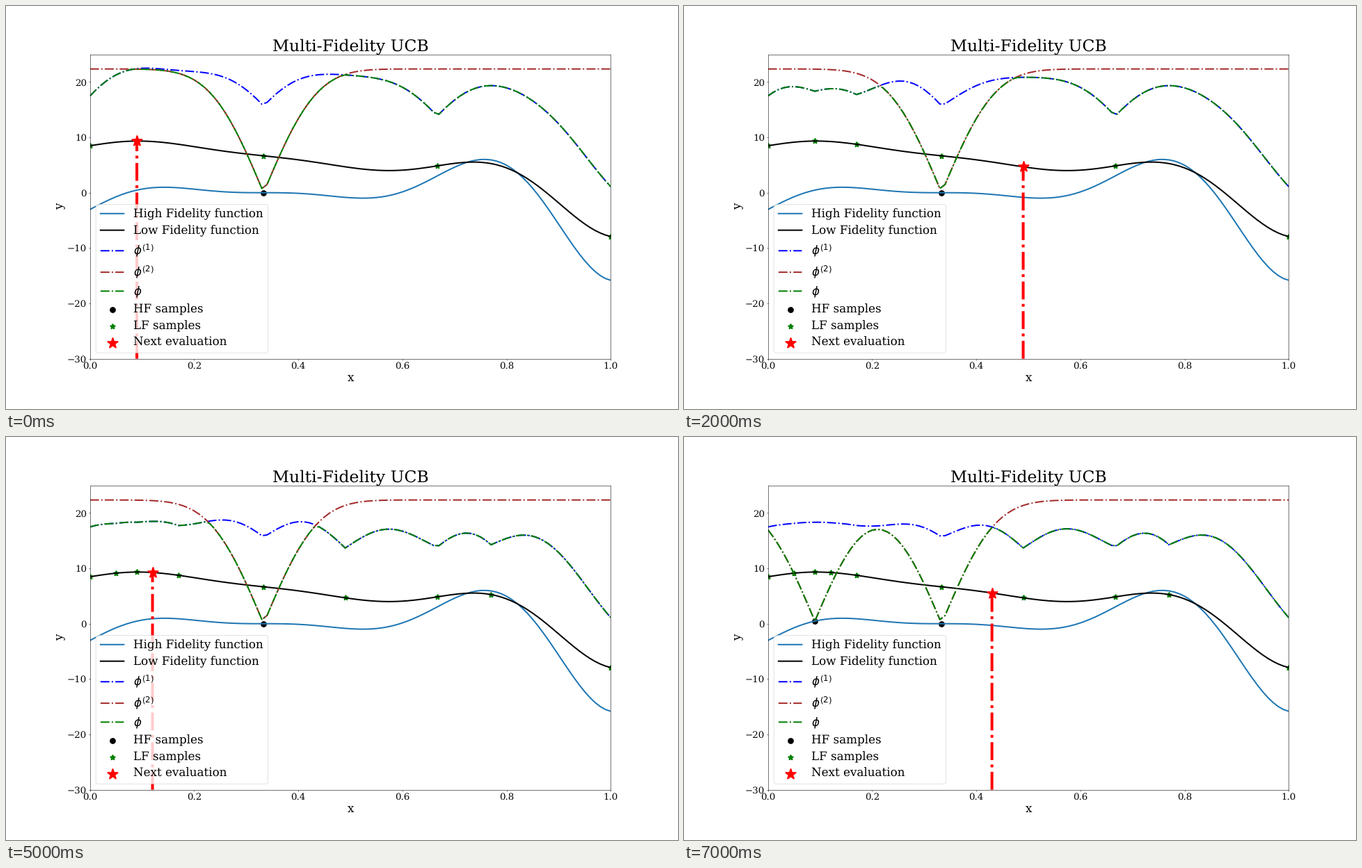
These frames come from a looping animation (966 px wide and 580 px high, 8000 ms). A matplotlib script:

```python
import numpy as np
import matplotlib.pyplot as plt
from matplotlib.animation import FuncAnimation
from matplotlib.patches import FancyBboxPatch
from matplotlib.transforms import IdentityTransform

W, H, DPI = 966, 580, 72  # at 72 dpi one point is one pixel
PT = 0.4830 * 100 / 72    # pixels per nominal design point
EM = 25 * PT
LINE = 3 * PT

plt.rcParams.update({
    "font.family": "DejaVu Serif",
    "text.hinting": "none",
    "axes.linewidth": 0.8 * PT,
    "axes.labelsize": EM,
    "axes.labelpad": 4 * PT,
    "axes.titlesize": 35 * PT,
    "axes.titlepad": 6 * PT,
    "lines.linewidth": LINE,
})
for axis in ("xtick", "ytick"):
    plt.rcParams.update({
        f"{axis}.labelsize": 20 * PT,
        f"{axis}.major.size": 3.5 * PT,
        f"{axis}.major.pad": 3.5 * PT,
        f"{axis}.major.width": 0.8 * PT,
    })

LENGTH = 0.1             # kernel length scale
WIDTH_LO = 10.0          # confidence widths of the two models
WIDTH_HI = np.sqrt(500)
BIAS = 9.0               # bound on the gap between the fidelities
Y_MIN, Y_MAX = -30, 25


def high(x):
    return -(6 * x - 2) ** 2 * np.sin(12 * x - 4)


def low(x):
    return 0.5 * high(x) - 10 * (x - 0.5) + 5


def kernel(a, b):
    return np.exp(-0.5 * ((a[:, None] - b[None, :]) / LENGTH) ** 2)


def upper_bound(x, samples, func, width):
    """Mean plus scaled deviation of a zero-mean Gaussian process."""
    gram = kernel(samples, samples) + 1e-8 * np.eye(len(samples))
    cross = kernel(x, samples)
    weights = np.linalg.solve(gram, cross.T).T
    var = 1 - np.sum(weights * cross, axis=1)
    return weights @ func(samples) + width * np.sqrt(np.maximum(var, 0))


# Points evaluated one after another: position and function
QUERIES = [(0.09, low), (0.17, low), (0.49, low), (0.05, low),
           (0.77, low), (0.12, low), (0.09, high), (0.43, low)]
START = {low: [0, 1 / 3, 2 / 3, 1], high: [1 / 3]}

grid = np.linspace(0, 1, 101)

fig = plt.figure(figsize=(W / DPI, H / DPI), dpi=DPI, facecolor="white")
ax = fig.add_axes([0.125, 0.1248, 0.775, 0.7552])
ax.set(xlim=(0, 1), ylim=(Y_MIN, Y_MAX), xlabel="x", title="Multi-Fidelity UCB")
ax.set_ylabel("y", labelpad=2.5 * PT)

# Looks shared by the plot and its legend
HIGH = dict(color="tab:blue")
LOW = dict(color="black")
PHI_LO, PHI_HI, PHI = (dict(color=c, linestyle="-.")
                       for c in ("blue", "brown", "green"))
HI_DOT = dict(color="black", marker="o", s=100 * PT ** 2)
LO_DOT = dict(color="green", marker="*", s=100 * PT ** 2)
STAR = dict(color="red", marker="*", s=500 * PT ** 2)

# Label, look and baseline height above the axes' bottom edge
LEGEND = [
    ("High Fidelity function", HIGH, 203.0),
    ("Low Fidelity function", LOW, 179.1),
    (r"$\phi^{(1)}$", PHI_LO, 149.5),
    (r"$\phi^{(2)}$", PHI_HI, 118.6),
    (r"$\phi$", PHI, 91.4),
    ("HF samples", HI_DOT, 66.4),
    ("LF samples", LO_DOT, 42.5),
    ("Next evaluation", STAR, 18.6),
]


def draw_legend():
    pixels = IdentityTransform()
    left, bottom = ax.bbox.x0 + 0.5 * EM, ax.bbox.y0
    ax.add_patch(FancyBboxPatch(
        (left, bottom + 0.5 * EM), 247.4, 213.6,
        boxstyle=f"round,pad=0,rounding_size={0.2 * EM}", transform=pixels,
        facecolor="white", edgecolor="0.8", linewidth=PT, alpha=0.8, zorder=5))
    start = left + 0.4 * EM
    for label, look, height in LEGEND:
        base = bottom + height
        if "marker" in look:
            ax.scatter(start + EM, base + 0.2625 * EM, linewidth=LINE,
                       transform=pixels, zorder=6, **look)
        else:
            ax.plot([start, start + 2 * EM], [base + 0.35 * EM] * 2,
                    transform=pixels, snap=False, zorder=6, **look)
        ax.text(start + 2.8 * EM, base, label, transform=pixels,
                fontsize=EM, va="baseline", zorder=6)


def bound_line(look):
    return ax.plot(grid, 0 * grid, **look)[0]


def dots(look, zorder=1):
    return ax.scatter([], [], linewidth=LINE, zorder=zorder, **look)


ax.plot(grid, high(grid), **HIGH)
ax.plot(grid, low(grid), **LOW)
bound_lo, bound_hi, bound = map(bound_line, (PHI_LO, PHI_HI, PHI))
stem, = ax.plot([], [], "-.", color="red", linewidth=6 * PT, snap=False)
hi_dots, lo_dots, star = dots(HI_DOT), dots(LO_DOT), dots(STAR, zorder=3)
draw_legend()


def place(artist, xs, func):
    artist.set_offsets(np.column_stack([xs, func(xs)]))


def samples_of(func, step):
    return np.array(START[func] + [x for x, f in QUERIES[:step] if f is func])


def update(step):
    lo, hi = samples_of(low, step), samples_of(high, step)
    phi_lo = upper_bound(grid, lo, low, WIDTH_LO) + BIAS
    phi_hi = upper_bound(grid, hi, high, WIDTH_HI)
    bound_lo.set_ydata(phi_lo)
    bound_hi.set_ydata(phi_hi)
    bound.set_ydata(np.minimum(phi_lo, phi_hi))

    place(lo_dots, lo, low)
    place(hi_dots, hi, high)
    x, func = QUERIES[step]
    place(star, np.array([x]), func)
    stem.set_data([x, x], [Y_MIN, func(x)])
    return bound_lo, bound_hi, bound, stem, lo_dots, hi_dots, star


anim = FuncAnimation(fig, update, frames=len(QUERIES), interval=1000,
                     repeat=True, repeat_delay=0, blit=False)
plt.show()
```
